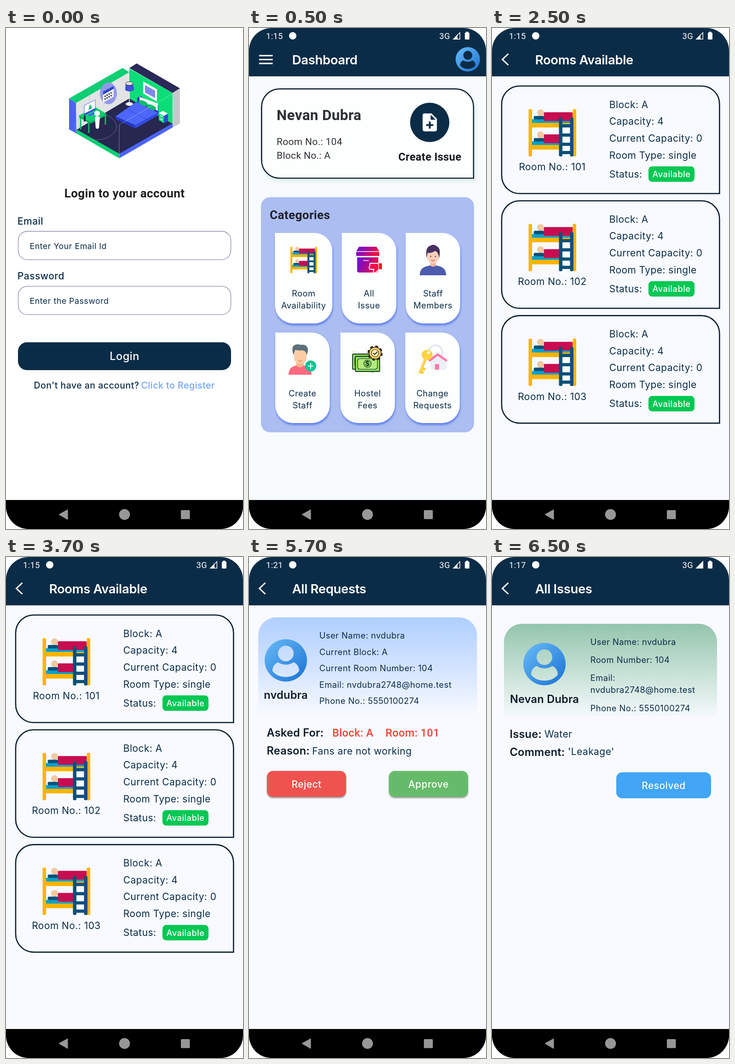
Write an HTML page that moves like this. It is 515 by 1088 pixels and loops after 8 s.

```html
<!DOCTYPE html>
<html lang="en">
<head>
<meta charset="utf-8">
<title>Hostel app tour</title>
<style>
html, body { margin: 0; width: 100%; height: 100%; overflow: hidden; background: #fff; }
svg { display: block; width: 100%; height: 100%; }
text { letter-spacing: .45px; white-space: pre; }
.inter { font-family: Inter, sans-serif; font-optical-sizing: none; }
.bold { letter-spacing: .2px; }
.title { font-family: Inter, sans-serif; font-optical-sizing: none; letter-spacing: -.35px; }
.roboto { font-family: Roboto, sans-serif; letter-spacing: .33px; }
</style>
</head>
<body>
<svg id="stage" viewBox="0 0 515 1088"></svg>
<script>
const NAVY = '#0b2c47', INK = '#0b1f30', PAGE = '#f8faff';
const NAME = 'Nevan Dubra', USER = 'nvdubra', MAIL = 'nvdubra2748@home.test', PHONE = '5550100274';

// Drawing helpers
const text = (x, y, str, size, weight = 400, fill = NAVY, anchor = 'start', font = weight > 500 ? 'inter bold' : 'inter') =>
  `<text x="${x}" y="${y}" class="${font}" font-size="${size}" font-weight="${weight}" fill="${fill}" text-anchor="${anchor}">${str}</text>`;
const roboto = (x, y, str, size, weight, fill, anchor) => text(x, y, str, size, weight, fill, anchor, 'roboto');
const mid = (x, y, str, size, weight, fill) => text(x, y, str, size, weight, fill, 'middle');
const rect = (x, y, w, h, fill, r = 0, more = '') =>
  `<rect x="${x}" y="${y}" width="${w}" height="${h}" rx="${r}" fill="${fill}" ${more}/>`;
const circle = (x, y, r, fill, more = '') => `<circle cx="${x}" cy="${y}" r="${r}" fill="${fill}" ${more}/>`;
const ellipse = (x, y, rx, ry, fill, more = '') => `<ellipse cx="${x}" cy="${y}" rx="${rx}" ry="${ry}" fill="${fill}" ${more}/>`;
const poly = (points, fill, more = '') => `<polygon points="${points}" fill="${fill}" ${more}/>`;
const path = (d, fill, more = '') => `<path d="${d}" fill="${fill}" ${more}/>`;
const line = (d, color, width, more = '') => path(d, 'none', `stroke="${color}" stroke-width="${width}" ${more}`);
const at = (x, y, scale, body) => `<g transform="translate(${x} ${y}) scale(${scale})">${body}</g>`;

// Box with its own radius at each corner, clockwise from the top left
const box = (x, y, w, h, [a, b, c, d], fill, more) => path(
  `M${x + a} ${y}H${x + w - b}a${b} ${b} 0 0 1 ${b} ${b}V${y + h - c}a${c} ${c} 0 0 1 ${-c} ${c}` +
  `H${x + d}a${d} ${d} 0 0 1 ${-d} ${-d}V${y + a}a${a} ${a} 0 0 1 ${a} ${-a}Z`, fill, more);

// Disc with the figure cut out, so the backdrop shows through
const avatar = (x, y, r) => at(x, y, r / 46, path(
  'M-46 0a46 46 0 0 1 92 0a46 46 0 0 1-92 0ZM-17-15a17 17 0 0 1 34 0a17 17 0 0 1-34 0Z' +
  'M-17 4C-26 8-29 16-29 23C-22 32-12 36 0 36S22 32 29 23C29 16 26 8 17 4C7 11-7 11-17 4Z', 'url(#blue)', 'fill-rule="evenodd"'));

const sleeper = y => at(0, y, 1,
  rect(5, 29, 93, 11, '#fcb400') + rect(7, 22, 91, 8, '#07a0cc') + rect(33, 7, 63, 19, '#c70d4f', 2) +
  circle(26, 8, 7.5, '#f0c9a0') + rect(11, 15, 23, 7.5, '#0d5077', 3.5));
const bunk = (x, y, scale) => at(x, y, scale,
  sleeper(0) + sleeper(48) + rect(0, 0, 7.5, 103, '#fcb400', 3) + rect(96, 0, 7.5, 103, '#fcb400', 3) +
  rect(70, 41, 22, 58, '#fafcff') +
  [33, 53, 73, 91].map(v => rect(68, v, 26, 7, '#0d5077')).join('') +
  rect(66, 18, 7.5, 85, '#0d5077', 3) + rect(90, 18, 7.5, 85, '#0d5077', 3));

const navBar = rect(0, 1025, 515, 63, '#000') +
  path('M115 1056.500L134 1046V1067.500Z', '#979797', 'stroke="#979797" stroke-linejoin="round"') +
  circle(257.5, 1056.5, 11.8, '#979797') + rect(380, 1047, 19.5, 19.5, '#979797', 2);

const header = (title, time, full) => rect(0, 0, 515, 105, NAVY) +
  roboto(37, 24, time, 18.34, 400, '#fff') + circle(95, 17, 8, '#fff') +
  roboto(413.5, 23.5, '3G', 18.34, 400, '#fff') +
  (full ? poly('442,25 459,25 459,8', '#fff')
        : poly('444,24.300 458.300,24.300 458.300,10', 'none', 'stroke="#fff" stroke-width="1.400"') + poly('443,25 453,25 453,14', '#fff')) +
  rect(469, 10, 10, 15, '#fff', 1.5) + rect(471.5, 8, 5, 3, '#fff') +
  (title === 'Dashboard'
    ? line('M22 60H51.500M22 68.500H51.500M22 77H51.500', '#fff', 3) + avatar(475.5, 68, 26.5)
    : line('M35.500 56L22.500 68.300L35.500 80.500', '#fff', 3)) +
  text(93.7, 78.5, title, 27.5, 600, '#fff', 'start', 'title');

// Isometric bedroom
const room = () => {
  const dash = 'stroke-dasharray="2 1.500"';
  return poly('152,163 268,96 268,155 153,222', '#e2e3e4') +
    poly('268,88 362,141 362,208 268,153', '#0bde79') +
    poly('153,221 268,153 362,208 246,274', '#272750') +
    poly('137,153 253,87 268,96 152,163', '#0bcf73') +
    poly('137,153 152,163 153,229 137,220', '#4a63f4') +
    poly('268,87 284,77 378,131 362,141', '#292a58') +
    poly('362,141 378,131 378,207 362,216', '#c6c8cc') +
    poly('153,220 246,273 246,283 153,229', '#0bcf73') +
    poly('246,273 362,207 362,216 246,283', '#4a63f4') +
    line('M181 160V131L222 108V122M157 220V190L169 188', '#a5a8ae', 1, dash) +
    ellipse(195, 214, 45, 29, 'none', `stroke="#a5a8ae" ${dash}`) +
    ellipse(222.5, 142, 18.5, 23.5, '#9299e6') +
    poly('211,139 234,127 234,149 211,162', '#fff') + poly('211,138 234,126 234,132 211,145', '#2c45cf') +
    line('M214 149L232 139M214 155L232 145', '#272750', 3, 'stroke-dasharray="3 2"') +
    // floor lamp
    ellipse(268, 165, 8, 4, '#f3f3f3') + line('M268 135V165', '#f3f3f3', 1.5) +
    path('M260 120L259 134C262 139 275 139 278 134L276 120Z', '#3d50d8') + ellipse(268, 120.5, 8, 4, '#e9e4d3', 'stroke="#272750"') +
    // picture on the wall
    poly('298,116 328,133 328,160 298,142', '#fff') + poly('302,124 324,136 324,152 302,140', '#7d88ea') +
    // bed
    poly('285,152 292,148 331,169 331,187 285,163', '#1d35bd') + poly('290,149 330,164 330,180 290,160', '#f4f5fb') +
    poly('238,192 284,160 330,184 281,211', '#4d67fb') + poly('238,192 281,211 281,218 238,198', '#2139c5') +
    poly('281,211 330,184 330,190 281,218', '#324be0') +
    ellipse(298, 163, 11, 5, '#0bbd6b', 'transform="rotate(22 298 163)"') +
    ellipse(316, 172, 11, 5, '#0bbd6b', 'transform="rotate(22 316 172)"') +
    line('M262 176L307 199', '#2d46da', 1) +
    // nightstand
    poly('332,185 341,180 352,186 343,191', '#fff') + poly('332,185 343,191 343,207 332,200', '#0bde79') +
    poly('343,191 352,186 352,202 343,207', '#3149dc') + line('M335 190L340 193M335 197L340 200', '#fff', 1.5) +
    // desk
    line('M162 195V220M180 203V228M216 188V210', '#0bbd6b', 3) +
    poly('159,190 193,171 218,186 183,204', '#0bd072') + poly('159,190 183,204 183,208 159,194', '#09a45c') +
    poly('183,204 218,186 218,190 183,208', '#08b865') +
    poly('170,168 194,156 194,177 170,189', '#fff', 'stroke="#4a63f4"') + poly('170,186 194,174 194,178 170,190', '#3149dc') +
    poly('183,165 187,174 179,178', '#0bbd6b') + poly('178,189 190,183 194,186 182,192', '#4a63f4') +
    rect(169, 190, 4, 13, '#272750', 1) +
    path('M193 194Q198 189 204 194L202 217Q198 221 195 217Z', '#fff') + circle(198, 185.5, 6, '#fff') +
    line('M246 283V210L362 143', '#fff', .8, 'opacity=".5"') + line('M362 207V141', '#fff', .7, 'opacity=".6"');
};

const login = () => {
  const field = (y, label, hint) => text(25, y, label, 20.97, 500) +
    rect(26.6, y + 14.8, 462, 61.6, '#fff', 19.6, 'stroke="#8d8bab" stroke-width="1.300"') +
    text(51.5, y + 53, hint, 17.9);
  return rect(0, 0, 515, 1088, '#fff') + room() +
    roboto(257.5, 367.5, 'Login to your account', 26.2, 700, '#212121', 'middle') +
    field(426.7, 'Email', 'Enter Your Email Id') + field(546, 'Password', 'Enter the Password') +
    rect(26, 682.5, 463, 60.5, NAVY, 19.6) + mid(257.5, 721, 'Login', 23.6, 500, '#fff') +
    text(60.5, 783.3, "Don't have an account?", 19.5, 500) + text(293.5, 783.3, 'Click to Register', 19.65, 500, '#6fa3f5');
};

// Category icons
const issueIcon = () => path('M239 475H277L283 485V495H233V485Z', 'url(#crate)') + path('M235 498H281V527Q281 531 277 531H239Q235 531 235 527Z', 'url(#crate)') +
  line('M233 485.500H283M248 505H260', '#fff', 1.6) +
  path('M263 511H279L282 513V525L274 532H270L271 524H263Q260 521 262 518Z', '#f0124d', 'stroke="#fff" stroke-width="2"') +
  rect(282, 511, 7, 13, '#f51a2f', 1);
const staffIcon = () => path('M371 537Q371 520 388 517L400 514L412 517Q428 520 428.500 537Z', '#4d5cae') +
  path('M394 507H406V516Q400 521 394 516Z', '#eeb59e') + ellipse(400, 496, 13, 16, '#fbd0bb') +
  path('M386 500Q382 476 394 473Q401 468 408 474Q418 478 413 500Q412 488 405 484Q394 490 388 488Z', '#463063') +
  circle(395, 496, 1.3, '#463063') + circle(405, 496, 1.3, '#463063') + line('M396 504Q400 507 404 504', '#d0504f', 1.3);
const addIcon = () => path('M86 753Q86 736 102 733L111 729L121 733Q136 737 136 753Z', '#ff6a80') +
  path('M103 722H119V733Q111 741 103 733Z', '#f3b78c') + rect(98, 696, 27, 33, '#fdcca2', 12) +
  path('M97 711Q92 697 96 691Q102 685 112 688Q129 686 128 702L125 711Q125 702 117 700Q108 701 101 699Q98 703 97 711Z', '#5d717a') +
  line('M107 722Q111 725 116 722', '#c98360', 1.3) +
  circle(134, 734, 12, '#05c793') + line('M128 734H140M134 728V740', '#fff', 2);
const feesIcon = () => {
  const bill = (x, y) => rect(x, y, 53, 33, '#8edb61', 2, 'stroke="#17321c" stroke-width="1.800"') +
    rect(x + 5, y + 5, 43, 23, '#b2ec7f', 5, 'stroke="#17321c" stroke-width="1.200"');
  return bill(225, 708) + bill(231, 713) + circle(257.5, 729, 8, '#8edb61', 'stroke="#17321c" stroke-width="1.200"') +
    text(257.5, 734, '$', 14, 700, '#17321c', 'middle') +
    circle(274, 706, 14, 'none', 'stroke="#2e2512" stroke-width="5" stroke-dasharray="6 5"') +
    circle(274, 706, 13, '#fbd069', 'stroke="#2e2512" stroke-width="1.500"') + circle(274, 706, 8, '#fff0b5', 'stroke="#2e2512" stroke-width="1.200"') +
    line('M270 706L273 709L279 703', '#2e2512', 1.8) + circle(228, 703, 1, '#fbbf3e') + circle(254, 698, 1, '#fbbf3e') +
    circle(268, 748, 1.3, '#48b7e8') + circle(288, 738, 1, '#fbbf3e');
};
const keyIcon = () => circle(405, 704, 15, 'none', 'stroke="#dce3ea" stroke-width="3"') +
  poly('394,722 411,708 429,722 429,742 396,742', '#eceff5') + line('M391 723L410 709L430 723', '#ff78a9', 5, 'stroke-linejoin="round"') +
  rect(404, 730, 9, 12, '#ff78a9') +
  line('M385 715L371 750M376 739L383 742M373 746L379 749', '#fcca36', 6) + ellipse(387, 710, 12, 11, '#fcd341') +
  circle(390, 705, 3, '#fff') + line('M384 716L371 750', '#fee073', 1.8);

const dashboard = () => {
  const tile = (x, y, w, first, second) =>
    box(x, y, w, 196.5, [0, 39, 39, 39], '#fdfefe', 'filter="url(#tileShade)"') +
    mid(x + w / 2, y + 138, first, 18.34) + mid(x + w / 2, y + 164, second, 18.34);
  return rect(0, 0, 515, 1088, '#f8fbfd') + header('Dashboard', '1:15') +
    box(27.3, 132.3, 460.7, 194, [39, 39, 0, 39], '#fdfefe', `stroke="${INK}" stroke-width="2.600" filter="url(#cardShade)"`) +
    roboto(60, 200, NAME, 31.44, 700, '#2f3034') + roboto(60, 254, 'Room No.: 104', 20.97, 400, '#2f3034') +
    roboto(60, 284, 'Block No.: A', 20.97, 400, '#2f3034') +
    circle(392.7, 205, 42.7, NAVY) +
    at(369.5, 181.7, 1.94, path('M14 2H6c-1.100 0-2 .9-2 2v16c0 1.100.9 2 2 2h12c1.100 0 2-.9 2-2V8zm2 14h-3v3h-2v-3H8v-2h3v-3h2v3h3zm-3-7V3.500L18.500 9z', '#fff')) +
    roboto(393, 287.5, 'Create Issue', 23.6, 700, '#17191e', 'middle') +
    rect(26, 367.5, 463, 510.5, '#abbdf1', 19.6) + roboto(45, 414.5, 'Categories', 26.2, 700, '#20232b') +
    tile(56.5, 445, 124.5, 'Room', 'Availability') + tile(201.5, 445, 118.5, 'All', 'Issue') + tile(340.5, 445, 118.5, 'Staff', 'Members') +
    tile(57, 661.5, 118.5, 'Create', 'Staff') + tile(198.5, 661.5, 118.5, 'Hostel', 'Fees') + tile(339.5, 661.5, 118.5, 'Change', 'Requests') +
    bunk(90, 475, .56) + issueIcon() + staffIcon() + addIcon() + feesIcon() + keyIcon();
};

const rooms = () => {
  const card = i => at(0, i * 249.3, 1,
    box(21, 126, 473.4, 233.5, [39, 39, 0, 39], 'none', `stroke="${INK}" stroke-width="2.600"`) +
    bunk(79.5, 176, 1) + mid(131, 309, 'Room No.: 10' + (i + 1), 20.97) +
    ['Block: A', 'Capacity: 4', 'Current Capacity: 0', 'Room Type: single'].map((s, k) => text(254.8, 173.5 + k * 36.7, s, 20.97)).join('') +
    text(254.8, 324.7, 'Status:', 20.97) + rect(340, 300.5, 100, 33.5, '#00c853', 8) + mid(390, 324, 'Available', 18.34, 500, '#fff'));
  return rect(0, 0, 515, 1088, PAGE) + header('Rooms Available', '1:15') + [0, 1, 2].map(card).join('');
};

const small = (x, y, str) => text(x, y, str, 18.34);
const label = (y, str) => text(38.5, y, str, 23.6, 600, '#0d1b29');
const button = (x, y, w, fill, str, more) => rect(x, y, w, 56.5, fill, 13, more) + mid(x + w / 2, y + 36, str, 20.97, 500, '#fff');

const requests = () => rect(0, 0, 515, 1088, PAGE) + header('All Requests', '1:21') +
  box(20, 131, 475.5, 215, [39, 39, 0, 0], 'url(#sky)') + avatar(80, 224.5, 46) +
  mid(80, 308, USER, 23.6, 600, '#0d1b29') +
  ['User Name: ' + USER, 'Current Block: A', 'Current Room Number: 104', 'Email: ' + MAIL, 'Phone No.: ' + PHONE]
    .map((s, k) => small(152.7, 177.4 + k * 35.4, s)).join('') +
  label(390.3, 'Asked For:') + roboto(181, 390, 'Block: A', 23.6, 500, '#f44336') + roboto(296.5, 390, 'Room: 101', 23.6, 500, '#f44336') +
  label(429.3, 'Reason:') + text(137.2, 429, 'Fans are not working', 20.97) +
  button(39, 464.5, 172, '#ef5350', 'Reject', 'filter="url(#buttonShade)"') +
  button(304, 464.5, 172, '#66bb6a', 'Approve', 'filter="url(#buttonShade)"');

const issues = () => rect(0, 0, 515, 1088, PAGE) + header('All Issues', '1:17', true) +
  box(26, 145, 463, 200, [39, 39, 0, 0], 'url(#mint)') + avatar(114, 232.5, 46) +
  mid(114, 316.5, NAME, 23.6, 600, '#0d1b29') +
  small(213.7, 190.5, 'User Name: ' + USER) + small(213.7, 230, 'Room Number: 104') + small(213.7, 269.3, 'Email:') +
  small(213.7, 295.3, MAIL) + small(213.7, 334.7, 'Phone No.: ' + PHONE) +
  label(393, 'Issue:') + text(114, 391.7, 'Water', 20.97) +
  label(432, 'Comment:') + text(165, 429.7, "'Leakage'", 20.97) +
  button(270, 467.5, 206, '#42a5f5', 'Resolved');

const fade = (id, dir, ...colors) => `<linearGradient id="${id}" ${dir}>` +
  colors.map((c, i) => `<stop offset="${i / (colors.length - 1)}" stop-color="${c}"/>`).join('') + '</linearGradient>';
const shade = (id, dx, dy, blur, color) =>
  `<filter id="${id}" x="-20%" y="-20%" width="140%" height="150%"><feDropShadow dx="${dx}" dy="${dy}" stdDeviation="${blur}" flood-color="${color}"/></filter>`;
const down = 'x2="0" y2="1"';

const scenes = [[0, login], [500, dashboard], [2500, rooms], [4500, requests], [6500, issues]];
const stage = document.getElementById('stage');
stage.innerHTML = '<defs>' + fade('blue', 'x2="1" y2="1"', '#69bbf8', '#1a72d2') + fade('crate', 'x2="1" y2=".3"', '#6610e0', '#a00a9c', '#f0103e') +
  fade('sky', down, '#b0cfff', '#d3e3ff', PAGE) + fade('mint', down, '#94c5ad', '#c4dfd3', '#f4f9fb') +
  shade('tileShade', 1, 4, 2.2, '#5b7ee8') + shade('cardShade', 3, 6, 4, '#dcebec') + shade('buttonShade', 0, 2.5, 1.8, '#0006') +
  '<clipPath id="screen"><rect width="515" height="1088" rx="49"/></clipPath></defs><g clip-path="url(#screen)">' +
  scenes.map(([, draw]) => `<g class="scene">${draw()}</g>`).join('') + navBar + '</g>';
const groups = [...stage.querySelectorAll('.scene')];

function tick() {
  const now = performance.now() % 8000;
  const current = scenes.filter(([start]) => start <= now).length - 1;
  groups.forEach((g, i) => { g.style.display = i === current ? '' : 'none'; });
  requestAnimationFrame(tick);
}
tick();
</script>
</body>
</html>
```
